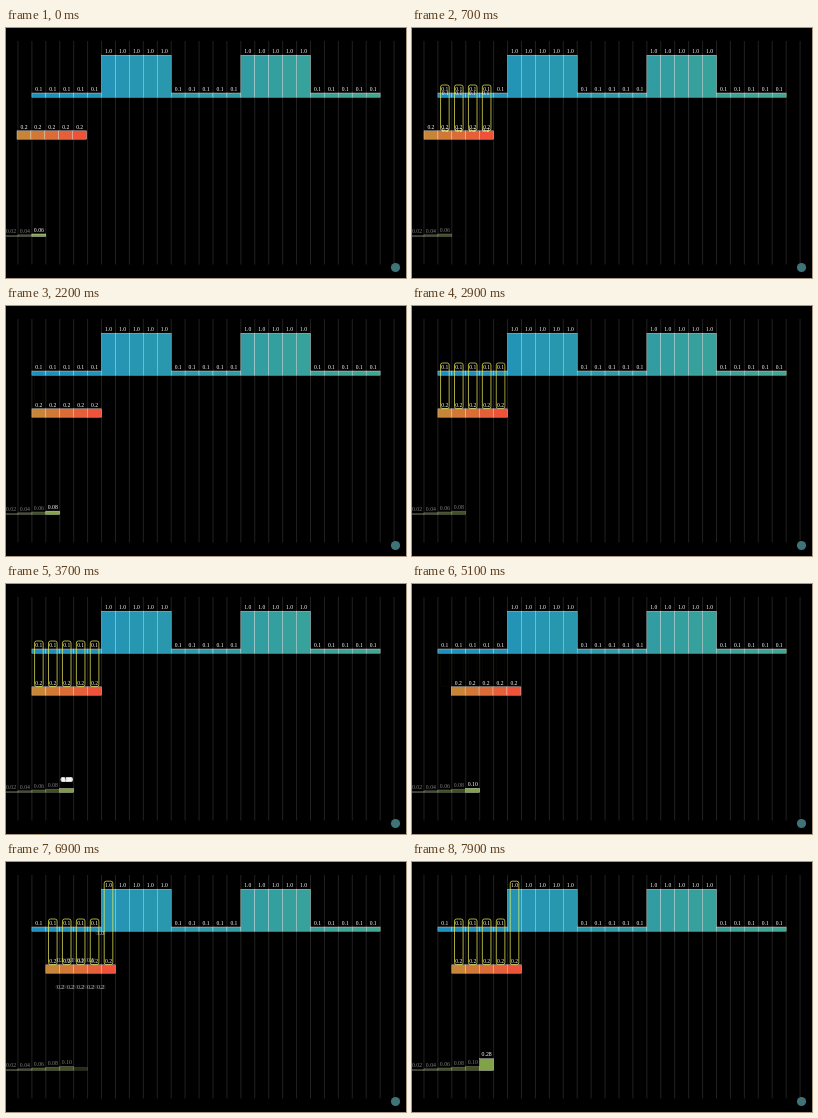
Write an HTML page that moves like this. It is 400 by 250 pixels and loops after 8 s.

```html
<!DOCTYPE html>
<html lang="en">
<head>
<meta charset="utf-8">
<title>Moving average</title>
<style>
  html, body { margin: 0; width: 100%; height: 100%; overflow: hidden; background: #000; }
  svg { display: block; width: 100vw; height: 100vh; }
  text { font-family: "Liberation Serif", "Times New Roman", serif; font-size: 5.6px; fill: #fff; text-anchor: middle; }
  .grid { stroke: #303030; stroke-width: .7; }
  .bar { stroke: #fff; stroke-opacity: .75; stroke-width: .45; }
  .link { fill: none; stroke: #f4f45a; stroke-width: .7; }
</style>
</head>
<body>
<svg id="stage" viewBox="0 0 400 250"></svg>
<script>
const LOOP = 8000, X0 = 25.9, W = 13.93, UNIT = 42;
const TOP = 69.2, MID = 111.2, LOW = 208.5;
const stage = document.getElementById('stage');

const clamp = v => Math.max(0, Math.min(1, v));
const mix = (a, b, u) => a + (b - a) * u;
const smooth = v => { const u = clamp(v); return u * u * u * (u * (6 * u - 15) + 10); };
const span = (t, [from, to]) => (t - from) / (to - from);
const slotX = i => X0 + i * W;
const centre = i => slotX(i + .5);
const blend = (a, b, u) => `rgb(${a.map((v, i) => Math.round(mix(v, b[i], u)))})`;

function add(parent, tag, attrs, content) {
  const el = document.createElementNS('http://www.w3.org/2000/svg', tag);
  for (const key in attrs) el.setAttribute(key, attrs[key]);
  if (content !== undefined) el.textContent = content;
  return parent.appendChild(el);
}
const place = (el, x, y) => el.setAttribute('transform', `translate(${x} ${y})`);
const fade = (el, v) => el.setAttribute('opacity', v);

function addBar(parent, x, base, value, fill) {
  const h = value * UNIT;
  return add(parent, 'rect', { class: 'bar', x, y: base - h, width: W, height: h, fill });
}

for (let i = -1; i <= 26; i++)
  add(stage, 'line', { class: 'grid', x1: slotX(i), x2: slotX(i), y1: 13, y2: 236.5 });

// Input signal
const signal = Array.from({ length: 25 }, (_, i) => Math.floor(i / 5) % 2 ? 1 : .1);
const labelY = i => TOP - signal[i] * UNIT - 2.2;
signal.forEach((v, i) => {
  addBar(stage, slotX(i), TOP, v, blend([28, 143, 190], [62, 166, 146], i / 24));
  add(stage, 'text', { x: centre(i), y: labelY(i) }, v.toFixed(1));
});

// Sliding window
const kernel = add(stage, 'g', {});
const KERNEL_Y = MID - .2 * UNIT - 2.3;
for (let i = 0; i < 5; i++) {
  addBar(kernel, i * W, MID, .2, blend([200, 133, 55], [238, 82, 56], i / 4));
  add(kernel, 'text', { x: (i + .5) * W, y: KERNEL_Y }, '0.2');
}

// Averages
const outY = v => LOW - v * UNIT - 2.3;
const outputs = [.02, .04, .06, .08, .1, .28].map((v, i) => {
  const g = add(stage, 'g', {});
  const bar = addBar(g, slotX(i - 2), LOW, v, 'rgb(130,162,72)');
  const label = add(g, 'text', { x: centre(i - 2), y: outY(v), style: 'font-size:5.8px' }, v.toFixed(2));
  return { v, g, bar, label };
});

// Each step: window slides, pairs light up, products gather into an average
const steps = [
  { slide: [-430, 120], link: [120, 610], gather: [610, 1190], first: 0, count: 4 },
  { slide: [1260, 2150], link: [2150, 2970], gather: [2970, 3850], first: 0, count: 5 },
  { slide: [4030, 5330], link: [5330, 6450], gather: [6450, 7640], first: 1, count: 5 }
];

steps.forEach((s, n) => {
  s.out = outputs[n + 3];
  s.end = [centre(n + 1), outY(s.out.v)];
  s.links = [];
  s.flyers = [];
  for (let k = 0; k < s.count; k++) {
    const i = s.first + k, x = centre(i), y = labelY(i) - 5.8;
    s.links.push(add(stage, 'rect',
      { class: 'link', x: x - 4.3, y, width: 8.6, height: 102.6 - y, rx: 2 }));
    for (const [fromY, text] of [[labelY(i), signal[i].toFixed(1)], [KERNEL_Y, '0.2']]) {
      const g = add(stage, 'g', {});
      s.flyers.push({
        g, x, y: fromY,
        before: add(g, 'text', {}, text),
        after: add(g, 'text', { style: 'font-size:5.8px' }, s.out.v.toFixed(2))
      });
    }
  }
});

add(stage, 'circle', { cx: 389.5, cy: 239.5, r: 4.6, fill: '#3f7378' });

function drawLinks(s, next, t) {
  const lag = .5, total = 1 + (s.count - 1) * lag;
  const u = span(t, s.link);
  const leave = next ? 1 - smooth(span(t, next.slide)) : 1;
  s.links.forEach((el, k) => fade(el, smooth(u * total - k * lag) * leave));
}

function drawGather(s, t) {
  const u = span(t, s.gather), e = smooth(u);
  const flying = u > 0 && u < 1;
  for (const f of s.flyers) {
    fade(f.g, flying ? 1 : 0);
    place(f.g, mix(f.x, s.end[0], e), mix(f.y, s.end[1], e));
    fade(f.before, 1 - e);
    fade(f.after, e);
  }
  const h = s.out.v * UNIT * e;
  s.out.bar.setAttribute('y', LOW - h);
  s.out.bar.setAttribute('height', h);
  fade(s.out.bar, e);
  fade(s.out.label, u >= 1 ? 1 : 0);
}

function draw(t) {
  const moved = steps.reduce((sum, s) => sum + smooth(span(t, s.slide)), 0);
  place(kernel, slotX(moved - 2), 0);
  steps.forEach((s, n) => {
    drawLinks(s, steps[n + 1], t);
    drawGather(s, t);
  });
  outputs.forEach((o, i) => {
    const dimmer = steps[i - 2];
    const dim = i < 2 ? 1 : dimmer ? smooth(span(t, dimmer.link)) : 0;
    fade(o.g, 1 - .5 * dim);
  });
}

const start = performance.now();
function tick() {
  draw((performance.now() - start) % LOOP);
  requestAnimationFrame(tick);
}
draw(0);
requestAnimationFrame(tick);
</script>
</body>
</html>
```
